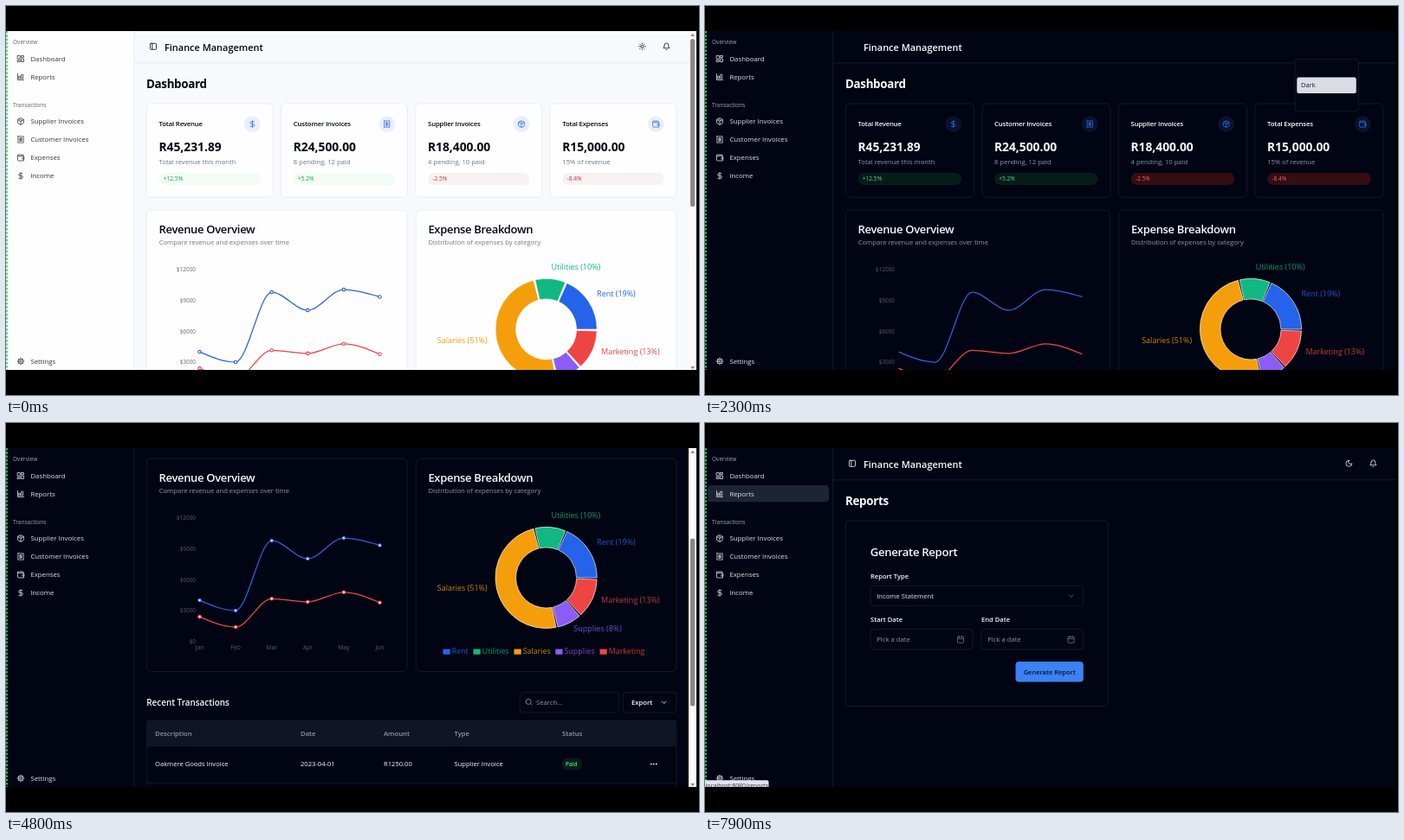
Write an HTML page that moves like this. It is 800 by 450 pixels and loops after 8000 ms.

```html
<!DOCTYPE html>
<html lang="en">
<head>
<meta charset="utf-8">
<title>Finance dashboard</title>
<style>
  html, body { margin: 0; width: 100%; height: 100%; overflow: hidden; background: #000; }
  svg { display: block; font-family: "Open Sans", "Noto Sans", sans-serif; }
  text { white-space: pre; }
  .light {
    --bg: #f8f9fc; --side: #fefefe; --card: #fefefe; --line: #e4e9f1; --head: #f1f4f9;
    --ink: #020817; --item: #33343c; --label: #62636c; --muted: #6b7789; --axis: #666;
    --up: #16a34a; --upBg: #f0fcf4; --down: #d42c2c; --downBg: #f8f1f2;
    --badge: #e8effd; --icon: #2f6df0; --edge: #4fdc7c; --hover: #f0f2f6;
  }
  .dark {
    --bg: #010513; --side: #010513; --card: #010513; --line: #171f2f; --head: #0f1525;
    --ink: #f8fafc; --item: #e2e3e8; --label: #a3a5ae; --muted: #8b98ab; --axis: #5c5c60;
    --up: #4ade80; --upBg: #051d18; --down: #f06a6a; --downBg: #360c13;
    --badge: #08142d; --icon: #376cf0; --edge: #22b455; --hover: #1c2536;
  }
  .dark .tag { opacity: .82; }
  .menu { filter: drop-shadow(0 2px 2px rgba(0, 0, 0, .12)); }
</style>
</head>
<body>
<svg id="stage" width="800" height="450" viewBox="0 0 800 450">
  <defs>
    <clipPath id="screen"><rect y="29" width="797" height="392"/></clipPath>
    <clipPath id="pane"><rect x="148" y="29" width="649" height="392"/></clipPath>
  </defs>
  <rect width="800" height="450"/>
  <g clip-path="url(#screen)">
    <rect y="29" width="797" height="392" fill="var(--bg)"/>
    <g clip-path="url(#pane)"><g id="page"></g></g>
    <g id="side"></g>
    <g id="bar"></g>
    <g id="menu" class="menu"></g>
  </g>
</svg>
<script>
const LOOP = 8000;
const $ = id => document.getElementById(id);
const clamp = v => Math.max(0, Math.min(1, v));
const ramp = (t, from, to) => clamp((t - from) / (to - from));
const ease = p => p * p * (3 - 2 * p);

const ICONS = {
  grid: 'M3 3h7v9H3zM14 3h7v5h-7zM14 12h7v9h-7zM3 16h7v5H3z',
  chart: 'M3 3v18h18M7 10h4v7H7zM15 5h4v12h-4z',
  box: 'M21 8a2 2 0 0 0-1-1.7l-7-4a2 2 0 0 0-2 0l-7 4A2 2 0 0 0 3 8v8a2 2 0 0 0 1 1.7l7 4a2 2 0 0 0 2 0l7-4A2 2 0 0 0 21 16ZM3.3 7l8.7 5 8.7-5M12 22V12M7.5 4.3l9 5.1',
  bill: 'M4 2v20l2-1 2 1 2-1 2 1 2-1 2 1 2-1 2 1V2l-2 1-2-1-2 1-2-1-2 1-2-1-2 1ZM16 8h-6a2 2 0 1 0 0 4h4a2 2 0 1 1 0 4H8M12 17.5v-11',
  wallet: 'M21 12V7H5a2 2 0 0 1 0-4h14v4M3 5v14a2 2 0 0 0 2 2h16v-5M18 12a2 2 0 0 0 0 4h4v-4Z',
  dollar: 'M12 2v20M17 5H9.5a3.5 3.5 0 0 0 0 7h5a3.5 3.5 0 0 1 0 7H6',
  gear: 'M9 12a3 3 0 1 0 6 0 3 3 0 1 0-6 0M4.5 12a7.5 7.5 0 1 0 15 0 7.5 7.5 0 1 0-15 0M12 2v3M12 19v3M2 12h3M19 12h3M5 5l2 2M17 17l2 2M5 19l2-2M17 7l2-2',
  panel: 'M5 3h14a2 2 0 0 1 2 2v14a2 2 0 0 1-2 2H5a2 2 0 0 1-2-2V5a2 2 0 0 1 2-2ZM9 3v18',
  sun: 'M8 12a4 4 0 1 0 8 0 4 4 0 1 0-8 0M12 2v2M12 20v2M4.9 4.9l1.4 1.4M17.7 17.7l1.4 1.4M2 12h2M20 12h2M6.3 17.7l-1.4 1.4M19.1 4.9l-1.4 1.4',
  moon: 'M12 3a6 6 0 0 0 9 9 9 9 0 1 1-9-9Z',
  bell: 'M6 8a6 6 0 0 1 12 0c0 7 3 9 3 9H3s3-2 3-9M10.3 21a1.9 1.9 0 0 0 3.4 0',
  down: 'M6 9l6 6 6-6',
  search: 'M3 11a8 8 0 1 0 16 0 8 8 0 1 0-16 0M21 21l-4.3-4.3',
  date: 'M5 4h14a2 2 0 0 1 2 2v14a2 2 0 0 1-2 2H5a2 2 0 0 1-2-2V6a2 2 0 0 1 2-2ZM16 2v4M8 2v4M3 10h18'
};

const icon = (name, cx, cy, color = 'var(--ink)', size = 9.33) =>
  `<path d="${ICONS[name]}" transform="translate(${cx - size / 2} ${cy - size / 2}) scale(${size / 24})"
    fill="none" stroke="${color}" stroke-width="2" stroke-linecap="round" stroke-linejoin="round"/>`;

const text = (x, y, str, size = 7.7, color = 'var(--ink)', weight = 400, anchor = 'start', track = 0) =>
  `<text x="${x}" y="${y}" font-size="${size}" fill="${color}" font-weight="${weight}"
    text-anchor="${anchor}" letter-spacing="${track * size}">${str}</text>`;

const title = (x, y, str, weight = 600, size = 13) => text(x, y, str, size, 'var(--ink)', weight, 'start', -.025);
const heading = str => title(162, 95.3, str, 700, 13.4);

const box = (x, y, w, h, r = 0, fill = 'var(--card)', stroke = 'none') =>
  `<rect x="${x}" y="${y}" width="${w}" height="${h}" rx="${r}" fill="${fill}" stroke="${stroke}" stroke-width=".8"/>`;

const frame = (x, y, w, h, r = 4) => box(x, y, w, h, r, 'var(--card)', 'var(--line)');

function sidebar(s) {
  const item = (y, name, label) => icon(name, 17, y, 'var(--item)') + text(28.4, y + 2.8, label, 7.8, 'var(--item)');
  return box(0, 29, 148, 392, 0, 'var(--side)') +
    box(147.4, 29, .9, 392, 0, 'var(--line)') +
    '<path d="M1 29V421" stroke="var(--edge)" stroke-width="2" stroke-dasharray="2.6 1.7"/>' +
    (s.link ? box(3, 72, 140, 19.3, 4, 'var(--hover)') : '') +
    text(8, 44.3, 'Overview', 6.55, 'var(--label)') +
    item(61, 'grid', 'Dashboard') +
    item(82, 'chart', 'Reports') +
    text(8, 117, 'Transactions', 6.55, 'var(--label)') +
    item(133.4, 'box', 'Supplier Invoices') +
    item(154.5, 'bill', 'Customer Invoices') +
    item(175.5, 'wallet', 'Expenses') +
    item(196.5, 'dollar', 'Income') +
    item(411, 'gear', 'Settings') +
    (s.link ? box(-2, 413.3, 75.5, 12, 2, '#dfe3ee') + text(.5, 421.6, 'localhost:8080/reports', 6.9, '#30343c') : '');
}

function header(s, right) {
  const x = right - 39.6;
  let out = box(148, 65.4, 649, .9, 0, 'var(--line)') + text(183, 51.9, 'Finance Management', 10.95, 'var(--ink)', 600);
  if (s.hover) out += box(x - 11.6, 35.4, 23.3, 23.3, 4, 'var(--hover)');
  if (s.ring) out += `<rect x="${x - 13}" y="33.5" width="26.4" height="26.4" rx="4.5" fill="none" stroke="#2343b8" stroke-width="1.9"/>`;
  if (s.icons) out += icon('panel', 170, 46.8) + icon(s.dark ? 'moon' : 'sun', x, 46.8) + icon('bell', right - 11.6, 46.8);
  return out;
}

const STATS = [
  ['Total Revenue', 'R45,231.89', 'Total revenue this month', '+12.5%', 'dollar'],
  ['Customer Invoices', 'R24,500.00', '8 pending, 12 paid', '+5.2%', 'bill'],
  ['Supplier Invoices', 'R18,400.00', '4 pending, 10 paid', '-2.5%', 'box'],
  ['Total Expenses', 'R15,000.00', '15% of revenue', '-8.4%', 'wallet']
];

function stats(right) {
  const w = (right - 162.3 - 28) / 4;
  return STATS.map(([name, value, note, change, pic], i) => {
    const x = 162.3 + i * (w + 9.33), end = x + w - 14.4;
    const tone = change[0] === '+' ? 'up' : 'down';
    return frame(x, 113, w, 108.3, 5) +
      title(x + 14.3, 139.4, name, 600, 7.8) +
      `<circle cx="${end - 9.4}" cy="136.6" r="9.4" fill="var(--badge)"/>` +
      icon(pic, end - 9.4, 136.6, 'var(--icon)') +
      text(x + 14.2, 168.2, value, 13.8, 'var(--ink)', 700) +
      text(x + 14.3, 182.9, note, 7.65, 'var(--muted)') +
      box(x + 14.3, 193, end - x - 14.3, 14, 7, `var(--${tone}Bg)`) +
      text(x + 19.5, 202.4, change, 6.6, `var(--${tone})`, 500);
  }).join('');
}

// Monotone cubic through evenly spaced points.
function curve(points, step) {
  const d = points.slice(1).map((p, i) => (p[1] - points[i][1]) / step);
  const m = points.map((_, i) => {
    const a = d[i - 1], b = d[i];
    return (Math.sign(a) + Math.sign(b)) * Math.min(Math.abs(a), Math.abs(b), Math.abs(a + b) / 4);
  });
  const last = points.length - 1;
  m[0] = (3 * d[0] - m[1]) / 2;
  m[last] = (3 * d[last - 1] - m[last - 1]) / 2;
  const h = step / 3;
  return points.map(([x, y], i) => i
    ? `C${x - step + h} ${points[i - 1][1] + m[i - 1] * h} ${x - h} ${y - m[i] * h} ${x} ${y}`
    : `M${x} ${y}`).join('');
}

function lineChart(s) {
  const step = s.resized ? 42.4 : 41.6;
  const at = i => 223.5 + i * step;
  const level = v => 447.7 - v * .0119;
  const series = (values, color) => {
    const pts = values.map((v, i) => [at(i), level(v)]);
    return `<path d="${curve(pts, step)}" fill="none" stroke="${color}" stroke-width="1.25"/>` +
      (s.dots ? pts.map(([x, y]) => `<circle cx="${x}" cy="${y}" r="1.75" fill="#fff" stroke="${color}" stroke-width="1.1"/>`).join('') : '');
  };
  return [0, 3000, 6000, 9000, 12000].map(v => text(219, level(v) + 2.3, '$' + v, 6.4, 'var(--axis)', 400, 'end')).join('') +
    ['Jan', 'Feb', 'Mar', 'Apr', 'May', 'Jun'].map((m, i) => text(at(i), 457.3, m, 6.8, 'var(--axis)', 400, 'middle')).join('') +
    series([4000, 3000, 9800, 8050, 10050, 9350], '#2b61de') +
    series([2400, 1398, 4150, 3850, 4780, 3780], '#ec4545');
}

const SHARES = [
  ['Rent', 19, '#2563eb', 504.5], ['Utilities', 10, '#10b981', 539.5], ['Salaries', 51, '#f59e0b', 586.5],
  ['Supplies', 8, '#8b5cf6', 634.3], ['Marketing', 13, '#ef4444', 685.5]
];

function donut(cx) {
  const cy = 374, pad = 2, total = SHARES.reduce((n, p) => n + p[1], 0);
  const polar = (r, deg) => [cx + r * Math.cos(deg * Math.PI / 180), cy - r * Math.sin(deg * Math.PI / 180)];
  let a = 0;
  return SHARES.map(([name, part, color, lx]) => {
    const sweep = part / total * (360 - pad * SHARES.length), b = a + sweep, big = +(sweep > 180);
    const [x, y] = polar(69.7, a + sweep / 2);
    const slice = `<path d="M${polar(58.6, a)}A58.6 58.6 0 ${big} 0 ${polar(58.6, b)}L${polar(35, b)}A35 35 0 ${big} 1 ${polar(35, a)}Z"
      fill="${color}" stroke="#fff" stroke-width=".65"/>`;
    a = b + pad;
    const shift = cx - 623.6;
    return slice + box(lx + shift, 456.5, 8.2, 6.2, 0, color) +
      `<g class="tag">${text(x, y, `${name} (${part}%)`, 9, color, 400, x < cx ? 'end' : 'start')}
      ${text(lx + 10.2 + shift, 462.3, name, 8.9, color)}</g>`;
  }).join('');
}

const ROWS = [
  ['Oakmere Goods Invoice', '2023-04-01', 'R1250.00', 'Supplier Invoice', 'Paid', 23],
  ['Pell Firm Payment', '2023-04-02', 'R3200.00', 'Income', 'Completed', 43],
  ['Office Rent', '2023-04-03', 'R2000.00', 'Expense', 'Paid', 23],
  ['Client Refund', '2023-04-04', 'R1800.00', 'Expense', 'Pending', 34]
];
const COLUMNS = [172, 340, 436, 517.5, 642];

function table(right) {
  const top = 539.5;
  let out = text(162.3, 522.3, 'Recent Transactions', 9.9, 'var(--ink)', 600) +
    frame(right - 180.8, 506.6, 114.4, 23.2) + icon('search', right - 170.5, 517.7, 'var(--muted)') +
    text(right - 162, 521, 'Search...', 7.7, 'var(--muted)') +
    frame(right - 61.8, 506.6, 61.8, 23.2) + text(right - 52, 521, 'Export', 7.7, 'var(--ink)', 600) +
    icon('down', right - 14.3, 518.3) +
    frame(162.3, top, right - 162.3, 230, 2) + box(162.7, top + .4, right - 163.1, 28.3, 0, 'var(--head)');
  ['Description', 'Date', 'Amount', 'Type', 'Status'].forEach((h, i) => out += text(COLUMNS[i], 556.8, h, 7.7, 'var(--muted)', 600));
  ROWS.forEach((row, i) => {
    const y = 589.6 + i * 42.8, wait = row[4] === 'Pending';
    out += box(162.3, y - 21.6, right - 162.3, .8, 0, 'var(--line)');
    for (let c = 0; c < 4; c++) out += text(COLUMNS[c], y + 2.8, row[c], 7.6);
    out += box(642, y - 7, row[5], 14, 7, wait ? '#2a1c10' : 'var(--upBg)') +
      text(646, y + 2.3, row[4], 6.5, wait ? '#facc15' : 'var(--up)', 600);
    for (let k = -1; k < 2; k++) out += `<circle cx="${right - 26.2 + k * 3}" cy="${y}" r=".95" fill="var(--ink)"/>`;
  });
  return out;
}

function dashboard(s, right) {
  const w = (right - 162.3 - 10.2) / 2, x2 = right - w;
  return heading('Dashboard') + stats(right) +
    frame(162.3, 236, w, 246.5, 5) + title(176.5, 263.2, 'Revenue Overview') +
    text(176.7, 276.4, 'Compare revenue and expenses over time', 7.65, 'var(--muted)') + lineChart(s) +
    frame(x2, 236, w, 246.5, 5) + title(x2 + 14.2, 263.2, 'Expense Breakdown') +
    text(x2 + 14.3, 276.4, 'Distribution of expenses by category', 7.65, 'var(--muted)') +
    donut(s.resized ? 630 : s.wide ? 627.8 : 623.6) + table(right);
}

function reports() {
  const field = (x, w, y, label, value, pic, color) =>
    text(x, y - 8.5, label, 7.6, 'var(--ink)', 600) + frame(x, y, w, 23.4) +
    text(x + 7.2, y + 14.5, value, 7.7, color) + icon(pic, x + w - 14, y + 11.8, '#6a7588');
  return heading('Reports') + frame(162.3, 113, 303, 214.5, 4) +
    title(190.8, 154.3, 'Generate Report', 600, 13.2) +
    field(191, 245.6, 188.3, 'Report Type', 'Income Statement', 'down', 'var(--item)') +
    field(191, 118, 238.6, 'Start Date', 'Pick a date', 'date', 'var(--muted)') +
    field(319, 117.6, 238.6, 'End Date', 'Pick a date', 'date', 'var(--muted)') +
    box(358.5, 276, 78.3, 23.4, 4, '#3b82f6') + text(397.7, 290.6, 'Generate Report', 7.5, '#0a1226', 600, 'middle');
}

function menu(s) {
  const row = (y, label, shown) => shown ? text(688, y, label, 7.5, '#1a2233') : '';
  return frame(681, 61.4, 73.4, 60.4, 3) +
    (s.pick ? box(683.3, 82.6, 68.5, 18.4, 2.5, s.dark ? '#d9dde4' : '#eef1f6') : '') +
    row(75.8, 'Light', !s.dark) + row(94.4, 'Dark', true) + row(112.6, 'System', !s.dark);
}

const scrollbar = () => box(788, 29, 9, 392, 0, '#fbfbfb') +
  '<path d="M790.3 35l2.3-3.2 2.3 3.2zM790.3 417l2.3 3.2 2.3-3.2z" fill="#8a8a8a"/>' +
  '<rect id="thumb" x="790" y="38" width="5.2" height="194" rx="2.6" fill="#888"/>';

function stateAt(t) {
  const within = (a, b) => t >= a && t < b;
  const onReports = t >= 7200;
  return {
    dark: t >= 2250,
    wide: within(1000, 2500) || onReports,
    resized: within(1200, 2500),
    dots: t < 1200 || t >= 4500,
    hover: within(900, 2250),
    icons: !within(2250, 2400),
    ring: within(2500, 7200),
    pick: t >= 1700,
    link: t >= 7000,
    onReports
  };
}

const scrollAt = t => 292 * (ease(ramp(t, 3450, 3880)) - ease(ramp(t, 4550, 5200)));

let shown = '';
function draw(t) {
  const s = stateAt(t), key = JSON.stringify(s);
  if (key !== shown) {
    shown = key;
    const right = s.wide ? 783 : 774;
    $('stage').setAttribute('class', s.dark ? 'dark' : 'light');
    $('page').innerHTML = header(s, right) + (s.onReports ? reports() : dashboard(s, right));
    $('side').innerHTML = sidebar(s);
    $('bar').innerHTML = s.wide ? '' : scrollbar();
    $('menu').innerHTML = menu(s);
  }
  const y = scrollAt(t), open = ramp(t, 1000, 1200);
  $('page').setAttribute('transform', `translate(0 ${-y})`);
  if ($('thumb')) $('thumb').setAttribute('y', 38 + y * 143 / 292);
  $('menu').setAttribute('opacity', open * (1 - ramp(t, 2400, 2500)));
  $('menu').setAttribute('transform', `translate(0 ${-3 * (1 - open)})`);
}

const start = performance.now();
function tick() {
  draw((performance.now() - start) % LOOP);
  requestAnimationFrame(tick);
}
tick();
</script>
</body>
</html>
```
